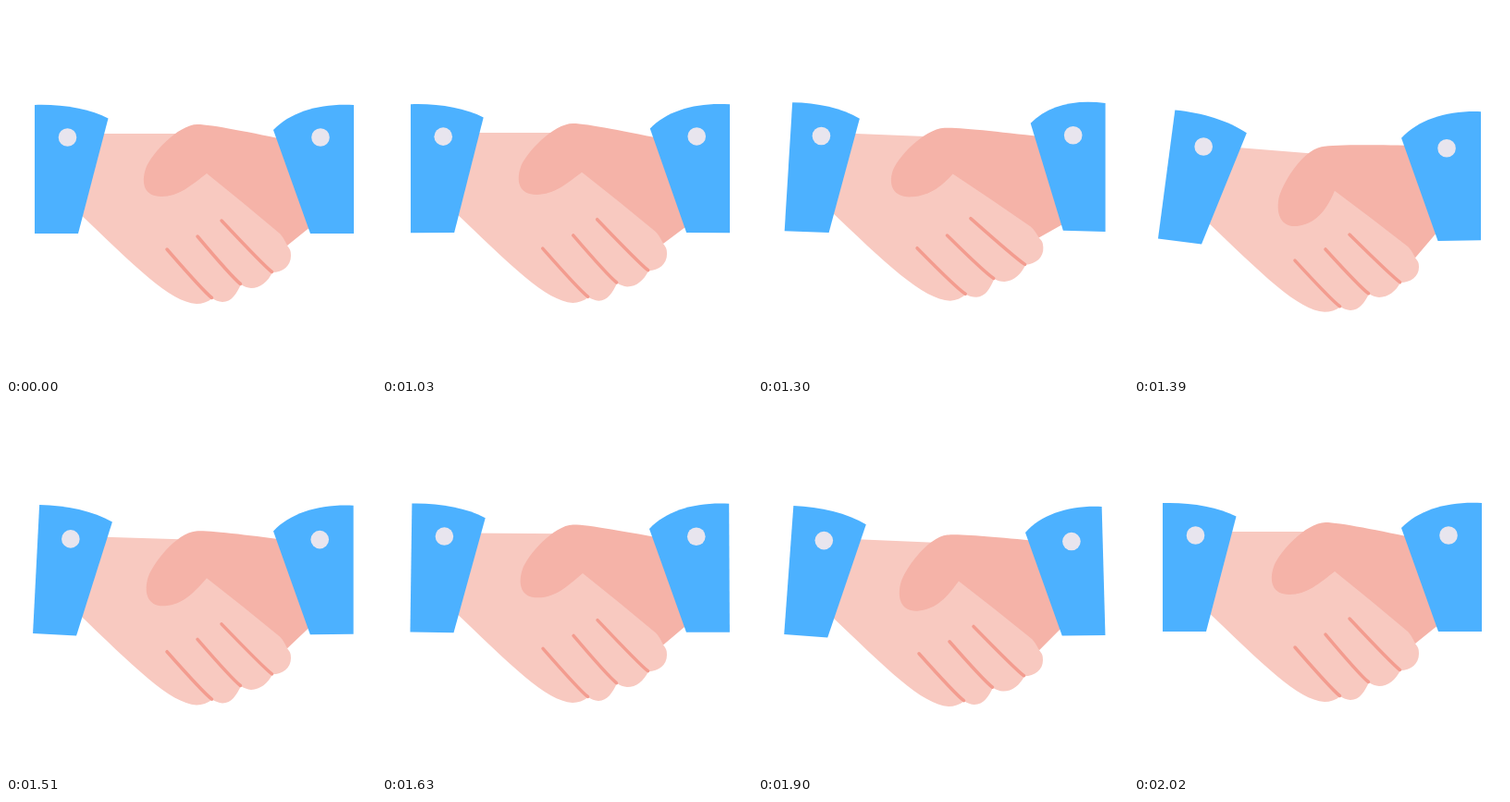
Recreate the animation shown at these times as an HTML page. Size 400 px wide and 400 px high, loop 2080 ms.

```html
<!DOCTYPE html>
<html lang="en">
<head>
<meta charset="utf-8">
<title>Handshake</title>
<style>
  html, body { margin: 0; width: 100%; height: 100%; overflow: hidden; background: #fff; }
  svg { display: block; width: 100vw; height: 100vh; }
</style>
</head>
<body>
<svg viewBox="0 0 400 400">
  <path id="palm" fill="#f8c9c0"/>
  <path id="creases" fill="none" stroke="#f39c8f" stroke-width="3.5" stroke-linecap="round"/>
  <path id="thumb" fill="#f5b3a8"/>
  <path id="leftCuff" fill="#4cb1ff"/>
  <path id="rightCuff" fill="#4cb1ff"/>
  <g fill="none" stroke="#e8e5ee" stroke-width="19.6" stroke-linecap="round">
    <path id="leftButton"/>
    <path id="rightButton"/>
  </g>
</svg>
<script>
const LOOP = 2080, START = 1030, STEP = 30, LAST = 2020;

const clamp = x => Math.max(0, Math.min(1, x));
const smooth = x => x * x * (3 - 2 * x);
const pulse = (t, from, peak, to) =>
  smooth(clamp(t < peak ? (t - from) / (peak - from) : (to - t) / (to - peak)));

// How far a rest point x,y travels when its part is fully up, down or tilted.
const reach = x => clamp((x - 60) / 130);
const inner = x => (376 - x) / 87;
const fields = {
  palm: {
    up: (x, y) => [reach(x) * (0.11 * (y - 285) + 0.03 * (x - 230)), -13 - 0.135 * Math.max(0, x - 200)],
    down: (x, y) => [0, (0.5 + 0.5 * reach(x)) * (19 - 0.071 * (y - 181))]
  },
  thumb: {
    up: (x, y) => [0.157 * (x - 247), -14 - 0.14 * (y - 129) + 0.05 * (x - 207)],
    down: (x, y) => [0.2 * (y - 150), 5 + 0.19 * (310 - x)]
  },
  leftCuff: {
    up: (x, y) => [0.0014 * (y - 220) * (x - 31), -10 - 0.04 * (x - 31)],
    down: (x, y) => [0.133 * (208 - y), 5.5 + 0.132 * (x - 31)]
  },
  rightCuff: {
    up: (x, y) => [inner(x) * (10.5 - 0.06 * (y - 134)), -10 - inner(x) * (11 - 0.05 * (y - 134))],
    down: x => [inner(x) - 1, 7.3 + 1.7 * inner(x)],
    tilt: (x, y) => [0.05 * (y - 246) * (1 - inner(x)), 0]
  },
  rightButton: { up: () => [3, -14.5], down: () => [-2, 12] },
  fixed: {}
};

// Rest shapes: the fingers and creases follow from the joints between the fingertips.
const joints = [[288, 288], [254, 301], [223, 316]];
const creaseStarts = [[233, 232], [207, 249], [174, 263]];
const near = ([x, y], dx, dy) => `${x + dx},${y + dy} `;

const fingers = joints.slice(1).map((end, i) =>
  'C' + near(joints[i], -5, 10) + near(end, 21, 4) + near(end, 11, 4) +
  'C' + near(end, 7, 3.8) + near(end, 3, 2) + near(end, 0, 0)).join('');

const creases = joints.map((end, i) =>
  `M${creaseStarts[i]} Q${near(end, -9, -7)}${near(end, -0.5, -0.5)}`).join('');

// Every part is a list of [field, path piece].
const parts = {
  palm: [['palm', 'M90,138 L196,138 L257,191 L301,243 L304,259 C307,263 308,264 308,270 ' +
    'C308,281 299,288 288,288 ' + fingers + 'C218,320 212,322 206,322 C177,320 140,282 75,220 Z']],
  creases: [['palm', creases]],
  thumb: [
    ['palm', 'M217,181 '],
    ['thumb', 'C200,194 187,206 168,206 S146,191 151,176 S186,128 207,128 C222,128 265,137 310,146 '],
    ['fixed', 'L340,230 '],
    ['palm', 'L304,259 Q300,250 296,246 Q257,213 217,181 Z']
  ],
  leftCuff: [['leftCuff', 'M31,107 C60,106 90,111 110.5,121.5 L78,246 L31,246 Z']],
  rightCuff: [['rightCuff', 'M376,107 C340,105 308,114 289,134 L329,246 L376,246 Z']],
  leftButton: [['leftCuff', 'M66.5,142 l0 0']],
  rightButton: [['rightButton', 'M340,142 l0 0']]
};

function amountsAt(ms) {
  const t = ms < START ? 0 : Math.min(LAST, START + STEP * Math.floor((ms - START) / STEP));
  const tilt = pulse(t, 1590, 1790, 2025);
  return { up: pulse(t, 994, 1210, 1400), down: pulse(t, 1210, 1400, 1590) + tilt, tilt };
}

function warp(path, field, amounts) {
  return path.replace(/([\d.]+),([\d.]+)/g, (_, px, py) => {
    let x = +px, y = +py;
    for (const move in field) {
      const [dx, dy] = field[move](+px, +py);
      x += amounts[move] * dx;
      y += amounts[move] * dy;
    }
    return `${x.toFixed(2)},${y.toFixed(2)}`;
  });
}

function draw(ms) {
  const amounts = amountsAt(ms);
  for (const id in parts) {
    const d = parts[id].map(([field, path]) => warp(path, fields[field], amounts)).join('');
    document.getElementById(id).setAttribute('d', d);
  }
}

const begin = performance.now();
function tick() {
  draw((performance.now() - begin) % LOOP);
  requestAnimationFrame(tick);
}
tick();
</script>
</body>
</html>
```
